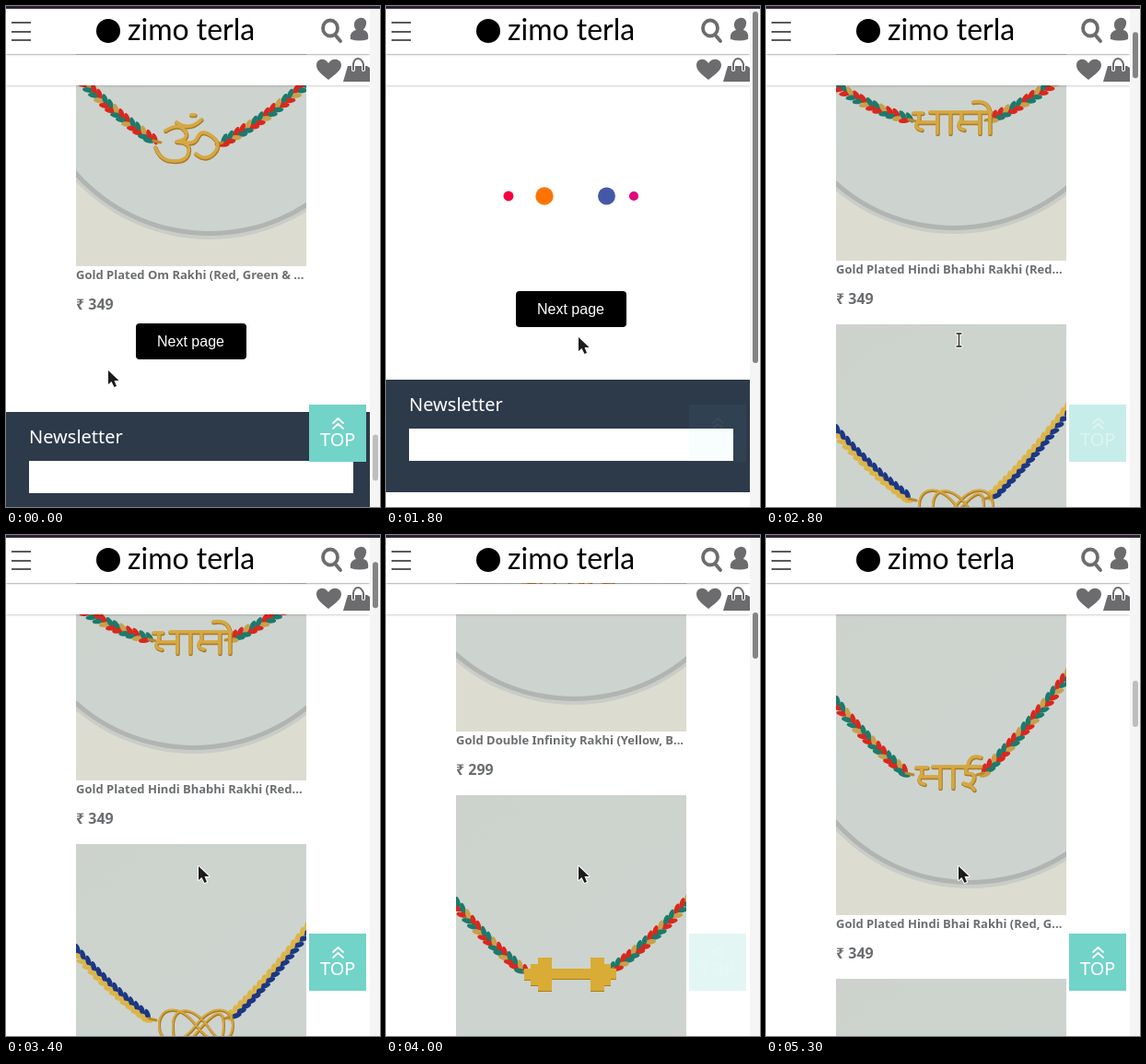
Animation of 406x543 px, one loop 5400 ms. Source, as an HTML page with a canvas:

```html
<!DOCTYPE html>
<html lang="en">
<head>
<meta charset="utf-8">
<title>Rakhi shop</title>
<style>
html, body { margin: 0; width: 100%; height: 100%; overflow: hidden; background: #fff; }
canvas { display: block; }
</style>
</head>
<body>
<canvas id="stage" width="406" height="543"></canvas>
<script>
const ctx = document.getElementById('stage').getContext('2d');
const LOOP = 5400, STEP = 100;
const CLICK = 1200, LOADED = 2200;
const IMG_X = 76, IMG_W = 250, IMG_H = 350, PITCH = 419, FIRST_Y = 117;
const NOTO = '"Noto Sans", "Open Sans", sans-serif';
const GREY = '#6b6e70';
const RED = '#d8281e', TEAL = '#1c7a6c', GOLD = '#c8a04c', BLUE = '#1b3785', YELLOW = '#dcb548';

// Left cord start and end, right cord start and end, all within the picture.
const KINDS = {
  bhabhi: { cord: [0, 160, 79, 197, 169, 196, 250, 146], lines:
    'M84 190h10M90 190v7q-7 9 3 11M90 200h20M110 189v23M102 189h66M124 189v23M136 190v7q-7 9 3 11M136 200h18M156 189v23M167 189v23M167 189q-2-14-18-11' },
  infinity: { cord: [0, 116, 79, 189, 169, 187, 250, 94], colors: [BLUE, YELLOW, BLUE, YELLOW], lines:
    'M130 196C112 172 90 176 90 196S112 220 130 196S170 176 170 196S148 220 130 196ZM105 196C105 174 128 176 142 196S160 214 160 196S152 178 130 205S105 214 105 196Z' },
  dumbbell: { cord: [0, 118, 74, 191, 171, 188, 250, 116], solid:
    'M74 188h7v-5h8v-7h15v12h42v-12h15v7h7v5h6v11h-6v7h-7v6h-15v-13h-42v13h-15v-6h-8v-6h-7z' },
  bhai: { cord: [0, 120, 76, 196, 160, 196, 250, 92], lines:
    'M87 190h12M93 190v7q-7 9 3 11M93 200h20M113 189v23M105 189h52M127 189v23M141 189v7q12 0 8 8t-11 3q9 2 12 7M143 188q2-13 14-9' },
  om: { cord: [0, 142, 84, 214, 159, 216, 250, 152], lines:
    'M97 203q15-9 21 0t-9 12q16 0 13 12t-23 8q-9-3-13-14M118 215q10 4 14-5t14-2q13 9 4 19t-20 1M109 194q14 10 27-3M125 186h4' }
};
const PRODUCTS = [
  ['bhabhi', 'Gold Plated Hindi Bhabhi Rakhi (Red...'],
  ['infinity', 'Gold Double Infinity Rakhi (Yellow, B...', 299],
  ['dumbbell', 'Gold Plated Dumbbell Rakhi (Red, G...'],
  ['bhai', 'Gold Plated Hindi Bhai Rakhi (Red, G...'],
  ['infinity', 'Gold Double Infinity Rakhi (Yellow, B...', 299],
  ['om', 'Gold Plated Om Rakhi (Red, Green & ...'],
  ['dumbbell', 'Gold Plated Dumbbell Rakhi (Red, G...'],
  ['bhai', 'Gold Plated Hindi Bhai Rakhi (Red, G...'],
  ['infinity', 'Gold Double Infinity Rakhi (Yellow, B...', 299],
  ['om', 'Gold Plated Om Rakhi (Red, Green & ...']
];
const LIST_END = FIRST_Y + IMG_H + PITCH * (PRODUCTS.length - 1);

// Keys are [time, value].
const SCROLL = [[1200, 206], [1300, 130], [1400, 35], [1500, 1.3], [1600, 0], [2500, 0], [2600, 40],
  [2700, 115], [2800, 191], [3000, 290], [3200, 270], [3400, 201], [3600, 60], [3700, 120], [3800, 210],
  [4000, 673], [4100, 600], [4300, 181], [4400, 290], [4700, 1130], [4800, 1260], [4900, 1312]];
const TOP_ALPHA = [[1400, 1], [1820, 0], [2630, 0], [2800, .4], [3050, 1], [3500, 1], [3800, 0],
  [3900, 0], [4000, .2], [4250, 1]];
const HOVER = [[850, 0], [900, .1], [1200, 1], [1600, 0]];
const MOUSE_X = [[300, 111], [500, 125], [700, 162], [900, 191], [1000, 204], [1100, 209]];
const MOUSE_Y = [[300, 395], [500, 400], [700, 390], [900, 376], [1000, 364], [1100, 359]];

function key(list, t) {
  const i = list.findIndex(k => k[0] > t);
  if (i < 0) return list[list.length - 1][1];
  if (!i) return list[0][1];
  const [t0, a] = list[i - 1], [t1, b] = list[i];
  return a + (b - a) * (t - t0) / (t1 - t0);
}

function rect(x, y, w, h, color, r = 0) {
  ctx.fillStyle = color;
  ctx.beginPath();
  ctx.roundRect(x, y, w, h, r);
  ctx.fill();
}

function disc(x, y, r, color) {
  ctx.fillStyle = color;
  ctx.beginPath();
  ctx.arc(x, y, r, 0, 7);
  ctx.fill();
}

function text(str, x, y, font, color) {
  ctx.font = font;
  ctx.fillStyle = color;
  ctx.fillText(str, x, y);
}

function fill(d, color) {
  ctx.fillStyle = color;
  ctx.fill(new Path2D(d));
}

function stroke(d, color, width) {
  ctx.strokeStyle = color;
  ctx.lineWidth = width;
  ctx.stroke(new Path2D(d));
}

function at(x, y, draw) {
  ctx.save();
  ctx.translate(x, y);
  draw();
  ctx.restore();
}

function cord(x0, y0, x1, y1, colors) {
  const dx = x1 - x0, dy = y1 - y0, len = Math.hypot(dx, dy), n = Math.round(len / 4);
  const angle = Math.atan2(dy, dx);
  for (let i = -1; i <= n; i++) {
    const u = i / n, side = i % 2 ? 1 : -1;
    const sag = 16 * u * (1 - u);
    at(x0 + dx * u, y0 + dy * u + sag, () => {
      ctx.rotate(angle);
      ctx.fillStyle = colors[(i + 4) % colors.length];
      ctx.beginPath();
      ctx.ellipse(0, side * 2.4, 6.5, 2.8, side * -.55, 0, 7);
      ctx.fill();
    });
  }
}

function picture(name) {
  const kind = KINDS[name], c = kind.cord;
  const colors = kind.colors || [RED, TEAL, RED, GOLD, TEAL];
  const cx = name === 'bhai' || name === 'om' ? 145 : 128;
  ctx.beginPath();
  ctx.rect(0, 0, IMG_W, IMG_H);
  ctx.clip();
  rect(0, 0, IMG_W, IMG_H, '#dcdcd0');
  disc(cx, 122, 199, '#c9cdc7');
  disc(cx, 120, 197, '#b0b5b1');
  const plate = ctx.createLinearGradient(0, 0, IMG_W, IMG_H);
  plate.addColorStop(0, '#cdd3cc');
  plate.addColorStop(1, '#cdd4d1');
  disc(cx, 120, 192, plate);
  rect(0, 0, IMG_W, 130, plate);
  cord(c[0], c[1], c[2], c[3], colors);
  cord(c[6], c[7], c[4], c[5], colors);
  const rings = `M${c[2]} ${c[3]}l8 2M${c[4]} ${c[5]}l-7 2`;
  stroke(rings, '#b88a2c', 3);
  if (kind.solid) {
    at(0, 1, () => fill(kind.solid, '#a97c20'));
    fill(kind.solid, '#d8ac35');
  } else {
    const w = name === 'infinity' ? 3 : 4.5;
    at(.5, 1, () => stroke(kind.lines, '#a87a26', w));
    stroke(kind.lines, '#d6a843', w - 1);
  }
}

function products(scroll, showImages) {
  PRODUCTS.forEach(([name, title, price = 349], i) => {
    const y = FIRST_Y + i * PITCH - scroll;
    if (y > 543 || y < -420) return;
    if (showImages) at(IMG_X, Math.round(y), () => picture(name));
    const end = Math.round(y) + IMG_H;
    text(title, IMG_X, end + 14, 'bold 13px ' + NOTO, GREY);
    text('₹ ' + price, IMG_X, end + 47, 'bold 16px ' + NOTO, GREY);
  });
}

function loader(t, scroll) {
  [[133, '#f5003c'], [172, '#ff7400'], [239.5, '#4459a5'], [269, '#e0087c']].forEach(([x, color], i) => {
    const phase = 3.38 + (t - 1800) / 160 - i * 1.24;
    disc(x, 206 - scroll, 6.4 + 3.9 * Math.sin(phase), color);
  });
}

function button(y, hover) {
  rect(141, y, 120, 39, '#000', 4);
  text('Next page', 164 - 12 * hover, y + 25, '16px "Liberation Sans", Arial, sans-serif', '#fff');
  ctx.globalAlpha = hover;
  text('»', 248 - 8 * hover, y + 25, '16px "Liberation Sans", Arial, sans-serif', '#fff');
  ctx.globalAlpha = 1;
}

function footer(y) {
  rect(0, y, 395, 122, '#2d3a4a');
  text('Newsletter', 25, y + 34, '20px ' + NOTO, '#fff');
  rect(25, y + 53, 352, 35, '#fff');
}

function topButton(alpha) {
  ctx.globalAlpha = alpha;
  rect(329, 432, 62, 62, '#72d3c8');
  stroke('M355 452l5.500-5 5.500 5M355 458l5.500-5 5.500 5', '#fff', 1.8);
  text('TOP', 341, 477, '20px ' + NOTO, '#fff');
  ctx.globalAlpha = 1;
}

function header() {
  ctx.shadowColor = 'rgba(0,0,0,.35)';
  ctx.shadowBlur = 3;
  rect(0, 53, 395, 33, '#fff');
  rect(0, 3, 395, 49, '#fff');
  ctx.shadowBlur = 0;
  ctx.shadowColor = 'transparent';
  [18, 28, 37].forEach(y => rect(6, y - 1, 21, 2, '#5a5a5a'));
  disc(111, 27, 13, '#000');
  text('zimo terla', 132, 37, '32px Lato, sans-serif', '#000');
  stroke('M360 24a8 8.500 0 1 1-16 0a8 8.500 0 1 1 16 0M357 31l6 7', '#6c6c6e', 3.8);
  fill('M384 13c5-1 8 3 7 7s-3 5-3 6c4 1 6 4 5 10q-9 3-19 0c-1-6 2-9 6-10c-4-5-2-12 4-13z', '#6c6c6e');
  fill('M350 80C341 73 337 69 337 64C337 57 346 55 350 62C354 55 364 57 364 64C364 69 359 73 350 80z', '#6c6c6e');
  fill('M371 65h21l3 2v15h-29z', '#6c6c6e');
  stroke('M377 69v-6q1-6 5-6t6 6v6', '#fff', 4);
  stroke('M377 69v-6q1-6 5-6t6 6v6', '#6c6c6e', 2);
}

function scrollbar(t, scroll, loading) {
  rect(395, 3, 11, 540, '#f5f5f5');
  const y = 6 + scroll * (loading ? .757 : .1159);
  const idle = t < CLICK || t >= 5300;
  rect(398, y, 6, loading ? 381 : 50, idle ? '#bebebe' : '#848484', 3);
}

function cursor(t) {
  at(key(MOUSE_X, t), key(MOUSE_Y, t), () => {
    let d = 'M0 0v15l3.500-3 3 6 2.500-1-2.500-6h5z', color = '#1c1c1c', edge = '#fff';
    if (t >= 900 && t < CLICK + 100)
      d = 'M0 2q1-2 3 0v5l7 2q2 1 1 4l-2 5h-6l-5-6q0-2 3-1z';
    if (t === 2700 || t === 2800) {
      stroke('M-2-4h5M.5-4v14M-2 10h5', '#fff', 3.5);
      stroke('M-2-4h5M.5-4v14M-2 10h5', '#222', 1.3);
      return;
    }
    stroke(d, edge, 2);
    fill(d, color);
  });
}

function draw(t) {
  const loading = t >= CLICK && t < LOADED;
  const scroll = t < CLICK ? LIST_END - 282 : key(SCROLL, t);
  const buttonY = Math.round((loading ? 309 : LIST_END + 62) - scroll);
  ctx.lineCap = ctx.lineJoin = 'round';
  rect(0, 0, 406, 543, '#fff');
  if (loading) loader(t, scroll);
  else products(scroll, t !== LOADED);
  button(buttonY, key(HOVER, t));
  footer(buttonY + 96);
  topButton(key(TOP_ALPHA, t));
  header();
  scrollbar(t, scroll, loading);
  rect(0, 0, 406, 3, '#2b2430');
  cursor(t);
}

const start = performance.now();
function tick() {
  const t = (performance.now() - start) % LOOP;
  draw(Math.floor(t / STEP) * STEP);
  requestAnimationFrame(tick);
}
tick();
</script>
</body>
</html>
```
